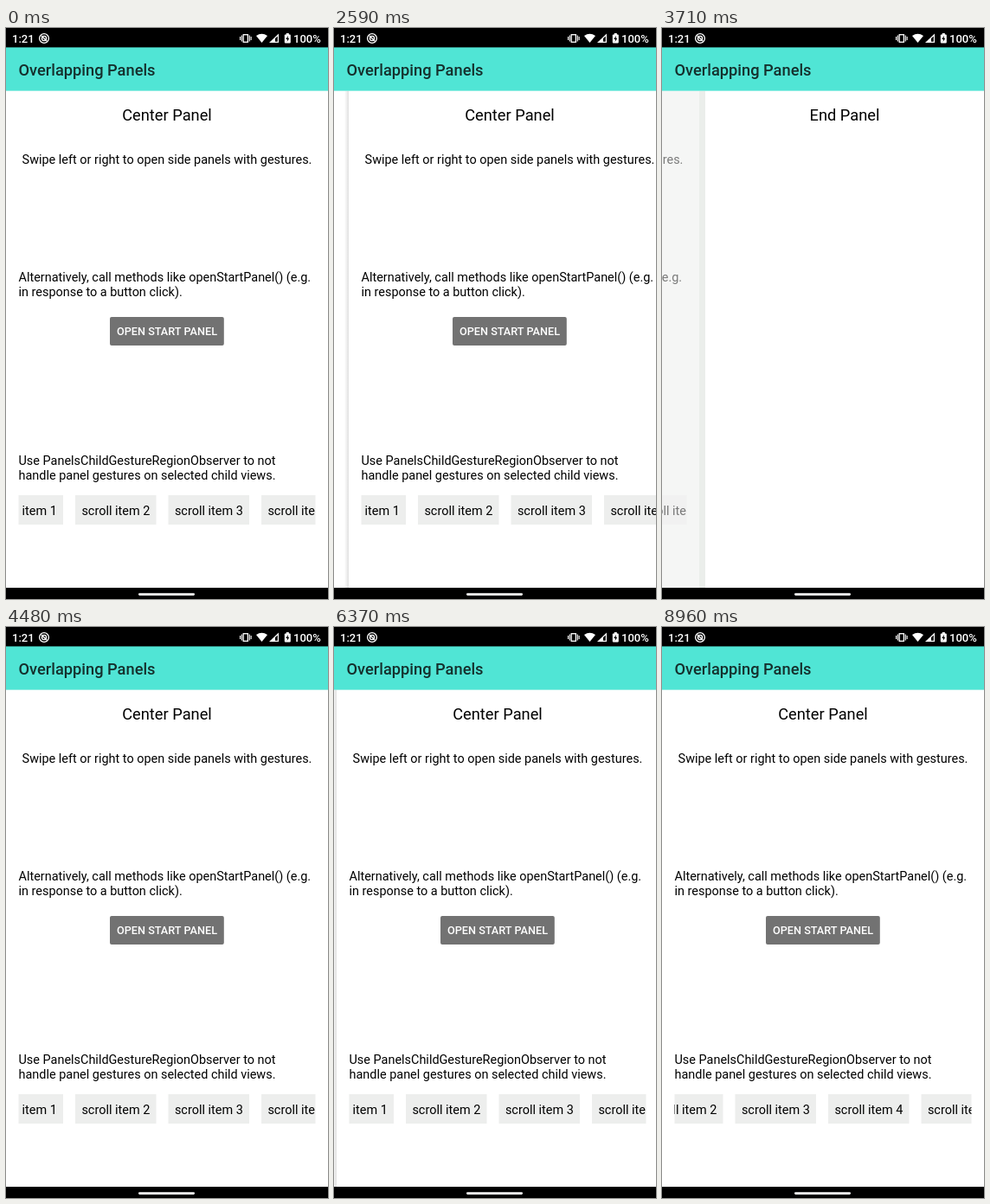
An HTML page with a canvas for the animation above (9.03 s loop, 372 px wide and 660 px high).

```html
<!DOCTYPE html>
<html lang="en">
<head>
<meta charset="utf-8">
<title>Overlapping Panels</title>
<style>
html, body { margin: 0; width: 100%; height: 100%; overflow: hidden; background: #fff; }
canvas { display: block; }
</style>
</head>
<body>
<canvas id="stage" width="372" height="660"></canvas>
<script>
const ctx = document.getElementById('stage').getContext('2d');
const W = 372, BAR = 22.4, TOP = 72.6, BOTTOM = 647, LOOP = 9030, STEP = 70;
const GAP = '#ebeeeb', OPEN = 328, BODY = 14.45;

const linear = p => p;
const easeIn = p => p * p;
const easeOut = p => 1 - (1 - p) ** 3;
const easeBoth = p => p * p * (3 - 2 * p);

// [start, end, from, to, easing]
const panelMoves = [
  [1120, 1400, 0, 150, easeIn], [1400, 1680, 150, OPEN, easeOut],
  [2240, 2450, OPEN, 79, linear], [2450, 2800, 79, 0, easeOut],
  [3080, 3360, 0, -150, easeIn], [3360, 3710, -150, -329, easeOut],
  [4020, 4270, -329, -90, linear], [4270, 4480, -90, 0, easeOut],
  [5180, 5530, 0, OPEN, easeBoth],
  [5850, 6160, OPEN, 47, linear], [6160, 6510, 47, 0, easeOut]
];
const scrollMoves = [
  [7100, 7300, 42, 14, linear], [7300, 7620, 14, 0, easeOut],
  [7660, 7980, 0, 80, linear], [7980, 8610, 80, 145, easeOut]
];
// [start, end, from x, to x, y, easing]
const touches = [
  [1120, 1400, 110, 260, 220, easeIn],
  [2310, 2450, 261, 95, 220, linear],
  [3080, 3360, 280, 130, 220, easeIn],
  [4060, 4270, 90, 290, 220, linear],
  [5110, 5180, 186, 186, 351, linear],
  [5880, 6160, 313, 59, 220, linear],
  [7140, 7300, 150, 190, 547, linear],
  [7660, 7980, 282, 202, 546, linear]
];

function valueAt(moves, t) {
  let v = moves[0][2];
  for (const [a, b, from, to, ease] of moves) {
    if (t < a) break;
    v = from + (to - from) * ease(Math.min(1, (t - a) / (b - a)));
  }
  return v;
}

function rect(x, y, w, h, color) {
  ctx.fillStyle = color;
  ctx.fillRect(x, y, w, h);
}

function rounded(x, y, w, h, r, color) {
  ctx.fillStyle = color;
  ctx.beginPath();
  ctx.roundRect(x, y, w, h, r);
  ctx.fill();
}

function shape(points, color) {
  ctx.fillStyle = color;
  ctx.beginPath();
  points.forEach(([x, y]) => ctx.lineTo(x, y));
  ctx.fill();
}

function text(str, x, y, size, { color = '#000', weight = 400, align = 'left' } = {}) {
  ctx.font = `${weight} ${size}px Roboto, sans-serif`;
  ctx.textAlign = align;
  ctx.fillStyle = color;
  ctx.fillText(str, x, y);
}

const heading = (str, x) => text(str, x, 107, 18.25, { align: 'center' });
const body = (str, y) => text(str, 14.5, y, BODY);

function drawItems(scroll) {
  ctx.save();
  ctx.beginPath();
  ctx.rect(14.5, 535, 343, 45);
  ctx.clip();
  for (let i = 0; i < 8; i++) {
    const x = 14.5 + i * 107.5 - scroll;
    rect(x, 540, 93.5, 34, '#edeeed');
    text('scroll item ' + (i + 1), x + 7.4, 563, BODY);
  }
  ctx.restore();
}

function drawCenter(x, scroll) {
  const openness = Math.min(1, Math.abs(x) / OPEN);
  ctx.save();
  ctx.translate(x, 0);
  rect(0, TOP, W, BOTTOM - TOP, GAP);
  // dims mostly as the side panel settles open
  ctx.globalAlpha = 1 - openness ** 4 / 2;
  rect(0, TOP, W, BOTTOM - TOP, '#fff');
  heading('Center Panel', W / 2);
  text('Swipe left or right to open side panels with gestures.', W / 2, 157, BODY, { align: 'center' });
  body('Alternatively, call methods like openStartPanel() (e.g.', 293);
  body('in response to a button click).', 310);
  rounded(120, 334, 131.8, 33, 2, '#727272');
  text('OPEN START PANEL', W / 2, 355, 12.67, { color: '#fff', weight: 500, align: 'center' });
  body('Use PanelsChildGestureRegionObserver to not', 505);
  body('handle panel gestures on selected child views.', 522);
  drawItems(scroll);
  ctx.restore();
}

function drawShadow(x) {
  const edge = x > 0 ? x : x + W;
  const far = edge + (x > 0 ? -5 : 5);
  const g = ctx.createLinearGradient(edge, 0, far, 0);
  g.addColorStop(0, 'rgba(0,0,0,.12)');
  g.addColorStop(1, 'rgba(0,0,0,0)');
  rect(Math.min(edge, far), TOP, 5, BOTTOM - TOP, g);
}

function drawSides(x) {
  rect(0, TOP, W, BOTTOM - TOP, GAP);
  if (x > 0) {
    rect(0, TOP, 321, BOTTOM - TOP, '#fff');
    heading('Start Panel', 160.5);
  } else if (x < 0) {
    rect(50, TOP, 322, BOTTOM - TOP, '#fff');
    heading('End Panel', 211);
  }
  if (x && Math.abs(x) < OPEN) drawShadow(x);
}

function drawStatus() {
  const white = '#fff';
  text('1:21', 7, 17, 13, { color: white, weight: 500 });

  ctx.strokeStyle = white;
  ctx.lineWidth = 1.3;
  ctx.beginPath();
  ctx.arc(44, 12, 5.4, 0, 7);
  ctx.moveTo(46.6, 12);
  ctx.arc(44, 12, 2.6, 0, 7);
  ctx.moveTo(41, 9);
  ctx.lineTo(47, 15);
  ctx.stroke();

  ctx.strokeRect(274.2, 7.7, 5.2, 8.6);
  for (const [x, h] of [[270.5, 2], [272.3, 3.5], [281.3, 3.5], [283.1, 2]]) {
    rect(x - .5, 12 - h, 1.1, h * 2, white);
  }

  ctx.fillStyle = white;
  ctx.beginPath();
  ctx.moveTo(295.5, 17);
  ctx.lineTo(289, 9);
  ctx.quadraticCurveTo(295.5, 4.5, 302, 9);
  ctx.fill();

  shape([[304, 17], [315, 17], [315, 6.5]], white);
  shape([[311, 15.8], [313.8, 15.8], [313.8, 9.4], [311, 12]], '#000');

  rounded(321.8, 7.5, 7, 10, 1, white);
  rect(323.8, 6, 3, 2, white);
  shape([[325.9, 8.8], [323.3, 13], [325, 13], [324.7, 16], [327.3, 11.8], [325.6, 11.8]], '#000');
  text('100%', 332, 17, 13, { color: white, weight: 500 });
}

function drawBars() {
  rect(0, 0, W, 23, '#000');
  rect(0, BAR, W, TOP - BAR, '#50e5d5');
  drawStatus();
  text('Overlapping Panels', 14.5, 55, 18.25, { color: '#15302d', weight: 500 });
  rect(0, BOTTOM, W, 660 - BOTTOM, '#000');
  rounded(153, 653.3, 65, 2.6, 1.3, '#fff');
}

function drawTouch(t) {
  for (const [a, b, from, to, y, ease] of touches) {
    if (t < a || t > b + STEP) continue;
    const p = Math.min(1, (t - a) / (b - a));
    ctx.globalAlpha = t > b ? .4 : 1;
    ctx.beginPath();
    ctx.arc(from + (to - from) * ease(p), y, 9.7, 0, 7);
    ctx.fillStyle = 'rgba(255,255,255,.9)';
    ctx.fill();
    ctx.strokeStyle = '#d9d9d9';
    ctx.lineWidth = 1.4;
    ctx.stroke();
    ctx.globalAlpha = 1;
  }
}

function frame(now) {
  const t = Math.floor((now % LOOP) / STEP) * STEP;
  const x = Math.round(valueAt(panelMoves, t));
  rect(0, 0, W, 660, '#fff');
  drawSides(x);
  drawCenter(x, valueAt(scrollMoves, t));
  drawTouch(t);
  drawBars();
}

const start = performance.now();
function tick() {
  frame(performance.now() - start);
  requestAnimationFrame(tick);
}
tick();
</script>
</body>
</html>
```
